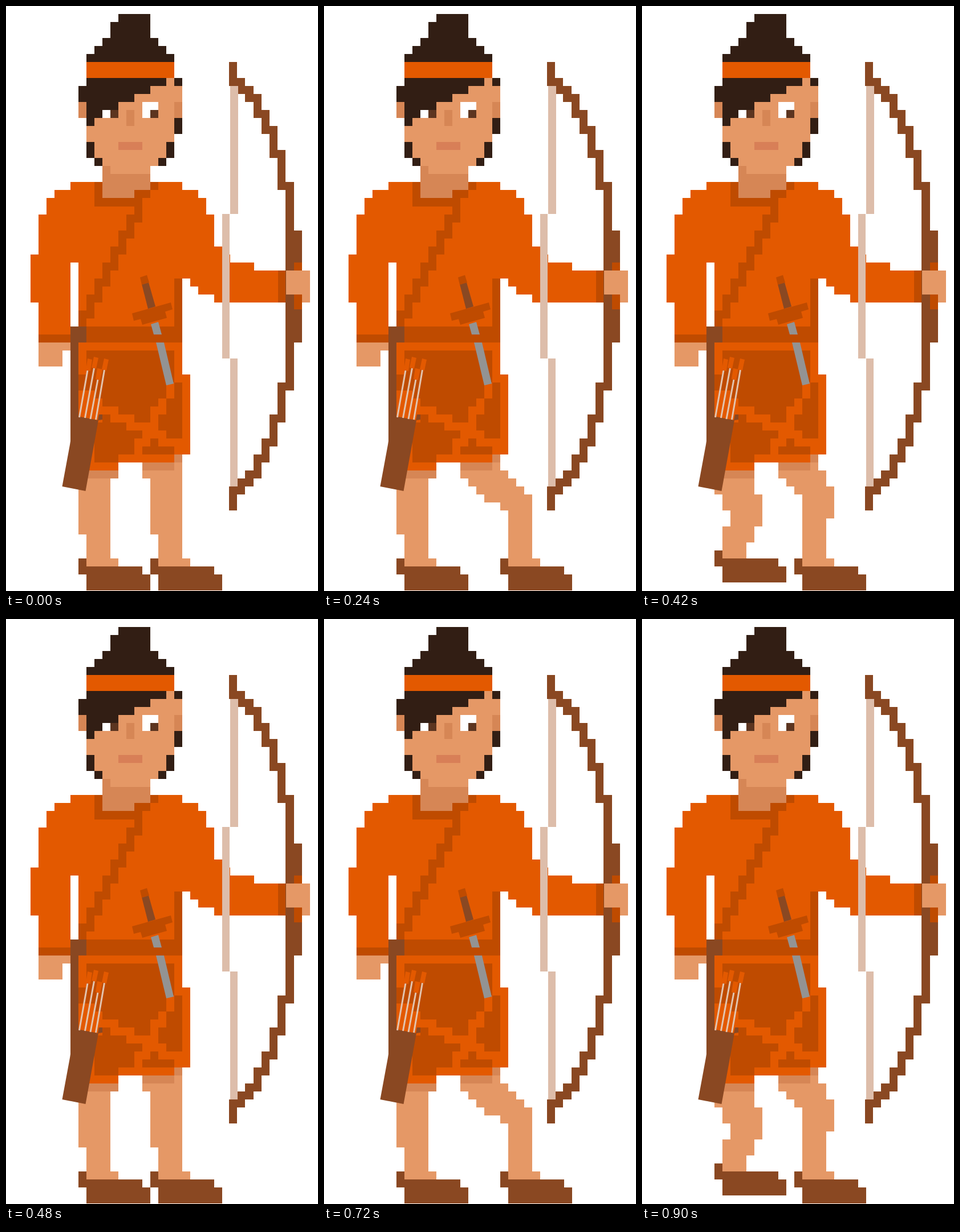
Recreate the animation shown at these times as an HTML page. Size 547 px wide and 1024 px high, loop 0.96 s.

```html
<!DOCTYPE html>
<html lang="en">
<head>
<meta charset="utf-8">
<title>Walking archer</title>
<style>
  html, body { margin: 0; width: 100%; height: 100%; overflow: hidden; background: #fff; }
  svg { display: block; width: 100%; height: 100%; }
  .hair { fill: #321e14; } .skin { fill: #e59866; } .shade { fill: #d68655; }
  .cloth { fill: #e35900; } .fold { fill: #bf4b00; } .wood { fill: #8a4822; }
  .cord { fill: #ddbdaa; } .steel { fill: #939393; } .white { fill: #fff; }
  .iris { fill: #5c3520; } .lips { fill: #d87f57; }
</style>
</head>
<body>
<svg viewBox="0 0 547 1024">
  <!-- most shapes sit on a 14 px cell grid -->
  <g transform="translate(1) scale(14 14.02)" shape-rendering="crispEdges">
    <path id="legL" class="skin"/>
    <path id="legR" class="skin"/>
    <path id="shoeL" class="wood"/>
    <path id="shoeR" class="wood"/>
    <path class="shade" d="M10 58H14V59H10ZM17 57H21V56H22V57H21V58H17Z"/>

    <path class="skin" d="M4 42H8V43H7V45H4Z"/>
    <path class="cloth" d="M8 22H22V23H24V24H25V26H26V30H27V31H28V32H31V33H35V37H26V36H24V35H23V34H22V46H23V56H21V57H14V58H9V32H8V42H4V37H3V31H4V26H5V24H6V23H8Z"/>
    <path class="fold" d="M4 41H8V42H4ZM9 40H22V42H9ZM21 34H22V40H21ZM34 33H35V37H34ZM11 22H12V24H16V23H18V22H19V23H18V24H17V26H16V25H11Z"/>
    <path id="seam" class="fold"/>
    <path class="fold" d="M10 43H21V47H20V49H19V50H18V52H16V51H14V50H12V49H11V48H9V46H10Z
      M21 47H22V54H20V53H19V51H20V49H21ZM18 54H19V55H21V56H17V55H18Z
      M12 51H13V52H15V53H17V54H16V56H14V57H11V52H12Z"/>
    <path class="wood" d="M8 40H10V42H9V55H8Z"/>

    <path class="skin" d="M10 9H22V12H21V19H19V20H18V21H13V20H12V19H10Z"/>
    <path class="shade" d="M9 12H10V14H9ZM21 12H22V14H21ZM15 13H16V15H15ZM12 20H13V21H18V23H16V24H12Z"/>
    <path class="hair" d="M14 1H18V4H19V5H20V6H21V7H10V6H11V5H12V4H13V2H14Z
      M10 9H20V10H18V11H16V12H14V13H12V14H11V15H10V12H9V10H10Z
      M21 9H22V10H21ZM21 14H22V16H21ZM10 17H11V19H12V20H11V19H10ZM20 17H21V19H20V20H19V19H20Z"/>
    <path class="cloth" d="M10 7H21V9H10Z"/>
    <path class="white" d="M12 13H13V14H12ZM17 12H19V14H17Z"/>
    <path class="iris" d="M13 13H14V14H13ZM18 13H19V14H18Z"/>
    <path class="lips" d="M14 17H17V18H14Z"/>
  </g>

  <path class="wood" d="M120 717 161 725 163 715H169V724L162 725 139.500 849 98.500 841 112 768Z"/>
  <path d="M128.500 720 143 638M138.500 721 154.500 634M148 723 161 654M157.500 724 172.500 637" stroke="#e2c3ae" stroke-width="3"/>
  <path class="cloth" d="M143 617 151 619 148 639 140 637ZM154 614 162 616 158 635 150 633ZM160 634 169 636 165 655 157 653ZM172 617 180 619 176 638 168 636Z"/>

  <path class="steel" d="M254 557 267 553 273 575H259ZM263 589H277L294 661 281 664Z"/>
  <path class="wood" d="M238 487 250 484 262 526 249 530Z"/>
  <path class="fold" d="M235 475 247 471 251 484 238 488ZM221 538 289 519 292 531 279 535 282 546 239 558 236 548 224 551Z"/>

  <g shape-rendering="crispEdges">
    <path id="bow" class="wood"/>
    <path class="cord" d="M393 140H407V364H393ZM379 364H392V617H379ZM393 617H406V841H393Z"/>
    <path class="fold" d="M505 449H519V531H505Z"/>
    <path class="skin" d="M491 463H533V519H519V505H491Z"/>
  </g>
</svg>
<script>
const STEP = 60;
const set = (id, d) => document.getElementById(id).setAttribute('d', d);
const box = (x, y, w, h) => `M${x} ${y}h${w}v${h}h${-w}z`;

// Bow: columns mirrored about the grip; each entry is [top, bottom] in rows
const bowCols = [[7, 10], [9, 11], [10, 12], [11, 14], [13, 16], [15, 19], [18, 23], [22, 35], [28, 35]];
const rowY = r => Math.round(r * 14.02);
set('bow', bowCols.map(([a, b], i) => {
  const x = Math.round(391 + i * 14.2), w = Math.round(391 + (i + 1) * 14.2) - x;
  return box(x, rowY(a), w, rowY(b) - rowY(a)) +
         box(x, rowY(70 - b), w, rowY(70 - a) - rowY(70 - b));
}).join(''));

// Diagonal seam: the same two-row step repeated down the chest
let seam = '';
for (let k = 0; k < 7; k++) seam += box(15 - k, 26 + 2 * k, 1, 2) + box(16 - k, 26 + 2 * k, 1, 1);
set('seam', seam);

// Front leg outlines between the shared hip and the shared back of the thigh
const frontLeg = [
  'V69H23V70H19V66',
  'V59H23V61H24V65H23V68H24V69H20V65H19V60',
  'V58H23V60H24V67H25V68H21V64H20V62H19V60',
  'V58H23V59H24V60H25V68H26V69H22V63H21V62H20V61H19V60',
  'V58H23V59H24V60H25V61H26V69H27V70H23V63H22V62H20V61H19V60',
  'V58H23V59H24V61H25V69H26V70H22V63H21V62H20V61H19V60',
  'V58H23V60H24V69H25V70H21V62H20V61H19V60',
  'V58H23V60H24V64H23V69H24V70H20V61H19V60'
];
const standing = 'H13V69H14V70H10V66';
const backLeg = {
  5: 'H14V63H13V69H9V65H10V63',
  6: 'H14V62H13V68H9V64H10V62',
  7: 'H14V61H15V65H14V67H13V69H10V65H11V63H10V61'
};

const shoe = (x, lift) => `M${x} ${69 - lift}h1v1h7v1h1v2h-8v-2h-1z`;
// Foot rises and falls over four steps
const rise = p => Math.max(0, 2 - Math.abs(p - 2));

function draw(now) {
  const p = Math.floor(now / STEP) % 8;
  set('legR', `M17 57H22${frontLeg[p]}H18V59H17Z`);
  set('legL', `M9 59${backLeg[p] || standing}H9Z`);
  set('shoeR', shoe(18 + 4 - Math.abs(p - 4), rise(p)));
  set('shoeL', shoe(p === 5 || p === 6 ? 8 : 9, rise(p - 4)));
}

function tick() {
  draw(performance.now());
  requestAnimationFrame(tick);
}
tick();
</script>
</body>
</html>
```
